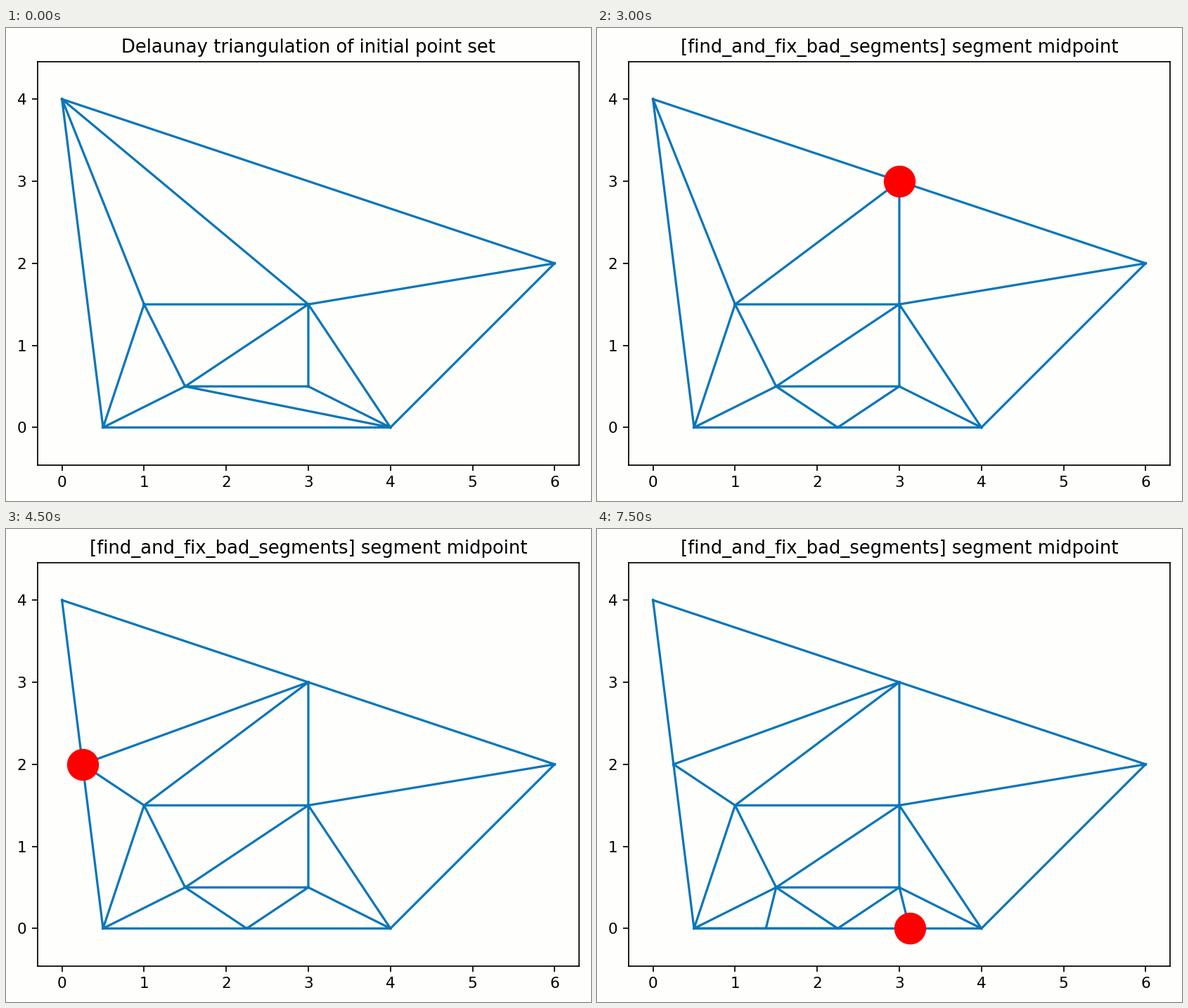
Write a matplotlib script that moves like this. It is 832 by 673 pixels and loops after 8 s.

```python
import matplotlib.pyplot as plt
from matplotlib.animation import FuncAnimation

W, H, DPI = 832, 673, 155.4
LEFT, TOP, AX_W, AX_H = 44.6, 47.6, 770.7, 574.4   # axes box in pixels
PAPER, BLUE = "#fefefd", "#0b76b9"
STEP_MS, TICK_MS, LOOP_MS = 1500, 500, 8000

POINTS = {
    "A": (0, 4), "B": (0.5, 0), "C": (4, 0), "D": (6, 2),
    "E": (1, 1.5), "F": (3, 1.5), "G": (1.5, 0.5), "H": (3, 0.5),
}
EDGES = "AB AE AF AD FD DC EF EB EG GF FH GH GB GC HC FC BC".split()

# new point, the segment it halves, other edges dropped, neighbours joined
SPLITS = [
    ("M", "BC", ["GC"], "GH"),
    ("N", "AD", ["AF"], "EF"),
    ("P", "AB", ["AE"], "NE"),
    ("Q", "BM", [], "G"),
    ("R", "MC", [], "H"),
]


def midpoint(p, q):
    return (p[0] + q[0]) / 2, (p[1] + q[1]) / 2


def build_stages():
    points, edges = dict(POINTS), list(EDGES)
    stages = [(list(edges), None)]
    for name, segment, dropped, joined in SPLITS:
        points[name] = midpoint(points[segment[0]], points[segment[1]])
        edges = [e for e in edges if e != segment and e not in dropped]
        edges += [name + other for other in segment + joined]
        stages.append((list(edges), name))
    return points, stages


points, stages = build_stages()

# the small margin keeps the pixel size from rounding down
fig = plt.figure(figsize=((W + 0.01) / DPI, (H + 0.01) / DPI), dpi=DPI,
                 facecolor=PAPER)
ax = fig.add_axes([LEFT / W, 1 - (TOP + AX_H) / H, AX_W / W, AX_H / H],
                  facecolor=PAPER)
unit = AX_W / 6.6
half = AX_H / unit / 2
ax.set_xlim(-0.3, 6.3)
ax.set_ylim(2 - half, 2 + half)
ax.set_xticks(range(7))
ax.set_yticks(range(5))

title = ax.set_title("", fontsize=12)
mesh, = ax.plot([], [], color=BLUE, lw=1.5)
dot, = ax.plot([], [], "o", color="red", ms=20, zorder=3)


def draw(i):
    edges, new = stages[i * TICK_MS // STEP_MS]
    xs, ys = [], []
    for a, b in edges:
        xs += [points[a][0], points[b][0], float("nan")]
        ys += [points[a][1], points[b][1], float("nan")]
    mesh.set_data(xs, ys)
    if new:
        x, y = points[new]
        dot.set_data([x], [y])
        title.set_text("[find_and_fix_bad_segments] segment midpoint")
    else:
        dot.set_data([], [])
        title.set_text("Delaunay triangulation of initial point set")
    return mesh, dot, title


anim = FuncAnimation(fig, draw, frames=LOOP_MS // TICK_MS, interval=TICK_MS,
                     repeat=True, repeat_delay=0, blit=False)
plt.show()
```
